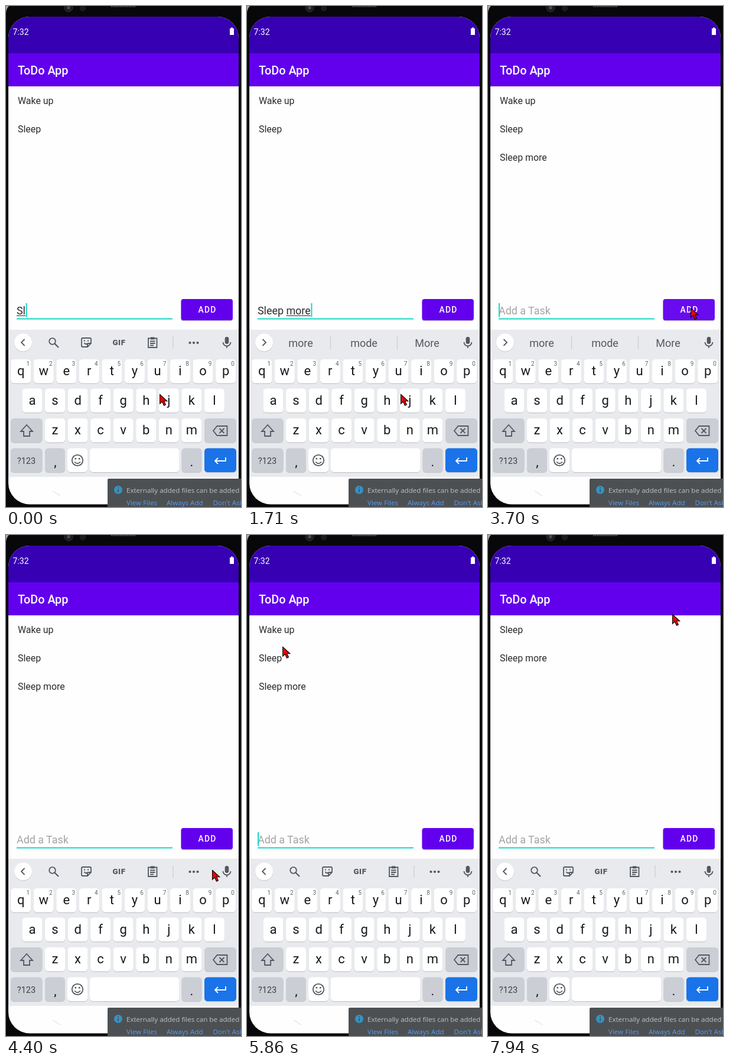
Write an HTML page that moves like this. It is 398 by 848 pixels and loops after 7.99 s.

```html
<!DOCTYPE html>
<html lang="en">
<head>
<meta charset="utf-8">
<style>
html, body { margin: 0; width: 100%; height: 100%; overflow: hidden; background: #08080a; }
svg { display: block; width: 398px; height: 848px; font-family: Roboto, sans-serif; }
text { white-space: pre; }
.mid { text-anchor: middle; }
.item { font-size: 15.9px; fill: #2b2b2b; }
.edit { font-size: 17.9px; }
.word { font-size: 18px; fill: #55585d; text-anchor: middle; }
.letter { font-size: 22px; fill: #17181a; text-anchor: middle; }
.hint { font-size: 10px; fill: #5f6368; text-anchor: middle; }
.icon { fill: none; stroke: #54585d; stroke-width: 1.8; }
.note { font: 11.6px "Open Sans", "Noto Sans", sans-serif; fill: #bfc1c3; }
.link { fill: #589df6; }
</style>
</head>
<body>
<svg viewBox="0 0 398 848">
  <defs><clipPath id="screen"><rect x="4" y="18" width="390" height="825.5" rx="36"/></clipPath></defs>

  <path d="M0 0H5Q1 4 0 11Z" fill="#a5a5a8"/>
  <g fill="#1b1b1e" stroke="#343438">
    <circle cx="106" cy="3" r="7"/><circle cx="106" cy="3" r="3" fill="#4a4a50"/>
    <circle cx="130" cy="4" r="4.5" stroke="#222"/>
  </g>
  <path d="M178 .5H220" stroke="#4a4a4d" stroke-width="3" stroke-dasharray="2 1"/>

  <g clip-path="url(#screen)">
    <path d="M4 18H394V844H4Z" fill="#fefefe"/>
    <path d="M4 18H394V80H4Z" fill="#3700b3"/>
    <path d="M4 80H394V136H4Z" fill="#6200ee"/>
    <path d="M4 548H394V797H4Z" fill="#e8eaee"/>
    <path d="M79 821L92 829" stroke="#d8d8d8"/>
  </g>
  <text x="11.5" y="48.5" font-size="14" fill="#fff">7:32</text>
  <path d="M379 38h2v-1.5h3V38h2v11h-7z" fill="#fff"/>
  <text x="20" y="116" font-size="19.8" font-weight="500" fill="#fff">ToDo App</text>

  <text class="item" x="20" y="166"></text>
  <text class="item" x="20" y="214"></text>
  <text class="item" x="20" y="262"></text>

  <path d="M18 529.5H282" stroke="#14d8c6" stroke-width="2.2"/>
  <text class="edit" id="edit" x="18" y="522"></text>
  <rect id="underline" y="523.6" height="1.2" fill="#3a3a3a"/>
  <rect id="caret" y="503" width="2" height="23.5" fill="#14d8c6"/>

  <rect x="296.5" y="497.5" width="87.5" height="36" rx="4" fill="#000" opacity=".22"/>
  <rect x="296.5" y="496" width="87.5" height="36" rx="4" fill="#6200ee"/>
  <rect id="ripple" x="296.5" y="496" width="87.5" height="36" rx="4" fill="#fff"/>
  <text class="mid" x="341" y="519" font-size="13.9" font-weight="500" letter-spacing="1.25" fill="#fff">ADD</text>

  <circle cx="29" cy="570.5" r="15.3" fill="#cfd2d6"/>
  <circle cx="29" cy="569.5" r="15" fill="#fff"/>
  <path id="chevron" class="icon" stroke-width="2"/>

  <g id="tools" class="icon">
    <circle cx="78.5" cy="567.5" r="5.3"/><path d="M82.5 571.5L89 578" stroke-width="2.2"/>
    <path d="M130 562H142Q144 562 144 564V571L138 577H130Q128 577 128 575V564Q128 562 130 562ZM144 571H140Q138 571 138 573V577M132.5 570Q135 574 138 571"/>
    <path d="M132 566.5h2M138 566.5h2" stroke-width="2"/>
    <text class="mid" x="191.5" y="574" font-size="13.3" font-weight="900" letter-spacing=".6" fill="#54585d" stroke="none">GIF</text>
    <path d="M241 562.5H255.500V578H241ZM244 567.500H252.500M244 571H252.500M244 574.500H250"/>
    <path d="M245 562.500H251.500" stroke-width="4"/>
    <path d="M283 559V580" stroke="#c9ccd1" stroke-width="1.2"/>
    <g fill="#54585d" stroke="none"><circle cx="311.500" cy="570" r="2.1"/><circle cx="318" cy="570" r="2.1"/><circle cx="324.500" cy="570" r="2.1"/></g>
  </g>
  <g id="words">
    <path d="M141.500 558V581M254.500 558V581" stroke="#c9ccd1" stroke-width="1.2"/>
    <text class="word" x="91" y="577"></text>
    <text class="word" x="198" y="577"></text>
    <text class="word" x="305" y="577"></text>
  </g>
  <rect x="370.700" y="560" width="6.600" height="12" rx="3.300" fill="#54585d"/>
  <path class="icon" d="M367.500 569a6.500 6.500 0 0 0 13 0M374 575.500V579"/>

  <g id="keys"></g>
  <g class="icon" stroke-width="2">
    <path d="M35 709L25 720H30V728H40V720H45Z"/>
    <path d="M351 719L357.500 711H374.500V727H357.500ZM361.500 715L369.500 723M369.500 715L361.500 723"/>
    <circle cx="121" cy="769" r="9.200"/><path d="M116 771.500Q121 777.500 126 771.500"/>
    <path d="M116.500 766.300h2.600M123 766.300h2.600" stroke-width="2.600"/>
    <path d="M372 764V770H354M359 765L354 770L359 775" stroke="#fff"/>
  </g>

  <path d="M172 848V802Q172 800 174 800H398V848Z" fill="#4d5052"/>
  <circle cx="190" cy="819" r="7" fill="#3592c4"/>
  <path d="M190 814.500v2M190 818v5" stroke="#4d5052" stroke-width="1.800"/>
  <text class="note" x="204" y="823.500">Externally added files can be added f</text>
  <text class="note link" x="204" y="845">View Files</text>
  <text class="note link" x="272" y="845">Always Add</text>
  <text class="note link" x="350.500" y="845">Don't Ask</text>

  <path id="pointer" d="M.6 .6V16.200L4.500 12.700L7.500 19.200L10.400 17.800L7.500 11.800H12.800Z" fill="#f00000" stroke="#000" stroke-width="1.100"/>
</svg>
<script>
const DURATION = 7990;
const $ = id => document.getElementById(id);
const items = document.querySelectorAll('.item');
const words = document.querySelectorAll('.word');

// Keyboard
const key = (x, y, w, fill = '#fff') =>
  `<rect x="${x}" y="${y + 1.2}" width="${w}" height="40.500" rx="5.500" fill="#c3c6cb"/>
   <rect x="${x}" y="${y}" width="${w}" height="40.500" rx="5.500" fill="${fill}"/>`;
const label = (type, x, y, s) => `<text class="${type}" x="${x}" y="${y}">${s}</text>`;
const grey = '#cbced4';
let keys = '';
[['qwertyuiop', 25.2, 598], ['asdfghjkl', 44.5, 647.5], ['zxcvbnm', 83, 698]].forEach(([row, x0, y], r) => {
  [...row].forEach((c, i) => {
    const x = x0 + i * 38.55;
    keys += key(x - 17, y, 34) + label('letter', x, y + 27.2, c);
    if (!r) keys += label('hint', x + 12, y + 10.7, (i + 1) % 10);
  });
});
keys += key(8, 698, 53.5, grey) + key(336, 698, 54, grey)
  + key(8, 748.5, 53.5, grey) + key(66, 748.5, 34, grey) + key(104, 748.5, 34)
  + key(142, 748.5, 151.5) + key(297.500, 748.5, 34, grey) + key(336, 748.5, 54, '#1a73e8')
  + label('letter', 83.500, 779, ',') + label('letter', 314.500, 779, '.')
  + '<text class="mid" x="34.500" y="774.500" font-size="14.500" fill="#3c4043">?123</text>';
$('keys').innerHTML = keys;

// [time, typed text, start of underlined word or -1, suggestions]
const typing = [
  [0, 'Sl', 0, ''],
  [40, 'Sl', 0, 'Sl Sleep Slow'],
  [300, 'Sle', 0, 'Sl Sleep Slow'],
  [340, 'Slee', 0, 'Sl Sleep Slow'],
  [380, 'Slee', 0, 'Slee Sleep Sleeping'],
  [590, 'Sleep', 0, 'Slee Sleep Sleeping'],
  [780, 'Sleep', 0, 'Sleep Sleeps Sleepy'],
  [1030, 'Sleep ', -1, 'Sleep Sleeps Sleepy'],
  [1100, 'Sleep ', -1, ''],
  [1240, 'Sleep m', 6, ''],
  [1430, 'Sleep mo', 6, 'mo more most'],
  [1560, 'Sleep mor', 6, 'mor more morning'],
  [1710, 'Sleep more', 6, 'more mode More'],
  [3455, '', -1, 'more mode More'],
  [3730, '', -1, '']
];
// [time, x, y]
const route = [
  [1850, 260, 657], [2330, 341, 494], [2470, 341, 502], [2620, 341, 503], [2820, 343, 511],
  [4220, 343, 511], [4500, 353, 598], [4600, 345, 565], [5010, 188, 297], [5070, 125, 239],
  [5230, 125, 239], [5430, 65, 217], [5540, 65, 217], [6100, 57, 168], [6360, 56, 163],
  [7280, 56, 163], [7460, 294, 146], [7760, 294, 146], [7940, 312, 134]
];

const ruler = document.createElement('canvas').getContext('2d');
const widthOf = s => {
  ruler.font = '17.9px Roboto, sans-serif';
  return ruler.measureText(s).width;
};

function pointerAt(t) {
  const i = route.findIndex(p => p[0] > t);
  if (i === 0) return route[0].slice(1);
  if (i < 0) return route.at(-1).slice(1);
  const [a, b] = [route[i - 1], route[i]];
  const k = (t - a[0]) / (b[0] - a[0]);
  return [1, 2].map(n => a[n] + (b[n] - a[n]) * k);
}

// The blink restarts after the last edit.
function caretOn(t) {
  const since = t < 1710 ? 0 : t < 3455 ? t - 1710 : t - 3455;
  return since % 970 < 485;
}

function rippleAt(t) {
  if (t < 3380 || t > 3740) return 0;
  return 0.2 * Math.min(1, (t - 3380) / 90, (3740 - t) / 180);
}

function draw(t) {
  const [, text, from, suggestions] = typing.findLast(s => s[0] <= t);
  const list = ['Wake up', 'Sleep'];
  if (t >= 3470) list.push('Sleep more');
  if (t >= 6770) list.shift();
  items.forEach((el, i) => el.textContent = list[i] || '');

  $('edit').textContent = text || 'Add a Task';
  $('edit').setAttribute('fill', text ? '#2b2b2b' : '#a3a3a3');
  const end = 18 + widthOf(text);
  const start = from < 0 ? end : 18 + widthOf(text.slice(0, from));
  $('underline').setAttribute('x', start);
  $('underline').setAttribute('width', end - start);
  $('caret').setAttribute('x', end + (text ? 0.7 : 0));
  $('caret').setAttribute('opacity', +caretOn(t));
  $('ripple').setAttribute('opacity', rippleAt(t));

  $('tools').style.display = suggestions ? 'none' : '';
  $('words').style.display = suggestions ? '' : 'none';
  $('chevron').setAttribute('d', suggestions ? 'M26.500 564L32 569.500L26.500 575' : 'M31.500 564L26 569.500L31.500 575');
  suggestions.split(' ').forEach((s, i) => words[i].textContent = s);

  $('pointer').setAttribute('transform', `translate(${pointerAt(t).map(Math.round)})`);
}

function loop() {
  draw(performance.now() % DURATION);
  requestAnimationFrame(loop);
}
loop();
</script>
</body>
</html>
```
